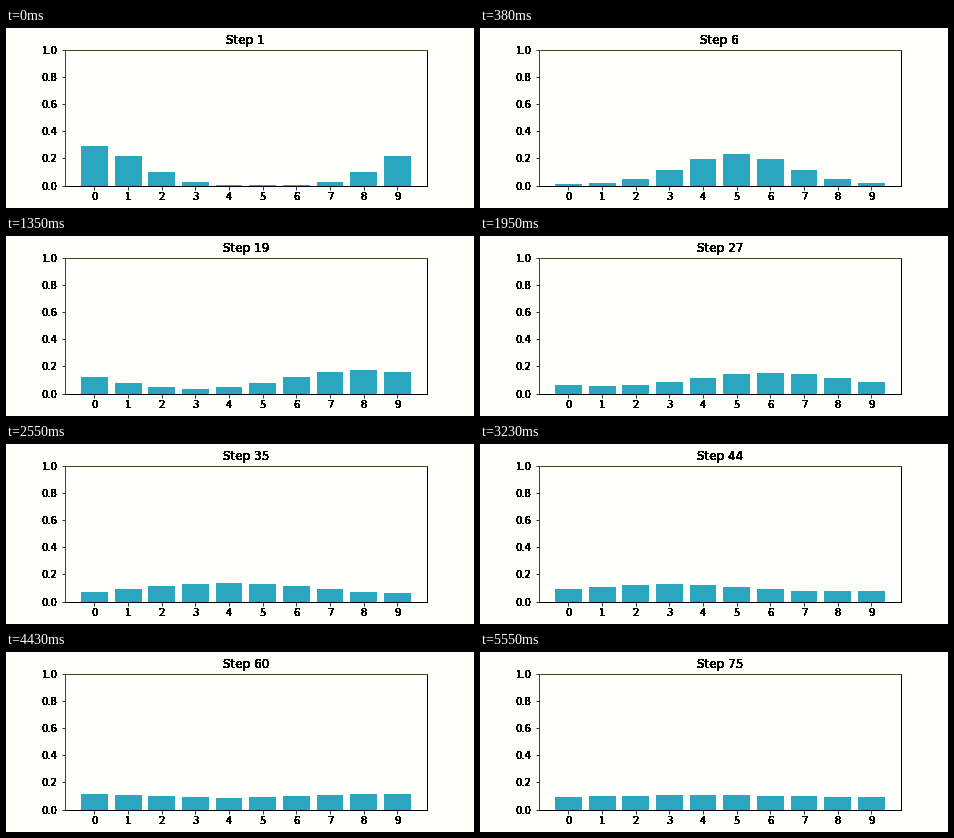
Animation, 468 px wide and 180 px high, one loop 5.62 s. Source, as a matplotlib script:

```python
import matplotlib.pyplot as plt
import numpy as np
from matplotlib.animation import FuncAnimation

CELLS, STEPS, LOOP_MS = 10, 75, 5620
WARMUP = 10  # moves made before the first step shown
PAPER, BLUE, OLIVE = "#fffffc", "#2ba6bf", "#464612"

plt.rcParams.update({
    "font.family": "DejaVu Sans",
    "font.size": 10,
    "axes.titlesize": 12,
    "axes.linewidth": 1,
    "figure.subplot.left": 0.125,
    "figure.subplot.right": 0.9,
    "figure.subplot.bottom": 0.125,
    "figure.subplot.top": 0.88,
})


def move(belief):
    """Shift one cell to the right, with a 10% under- and overshoot."""
    return (0.8 * np.roll(belief, 1)
            + 0.1 * belief
            + 0.1 * np.roll(belief, 2))


def run_filter():
    belief = np.eye(CELLS)[0]
    history = []
    for _ in range(WARMUP + STEPS):
        belief = move(belief)
        history.append(belief)
    return history[WARMUP - 1:WARMUP - 1 + STEPS]


def harden(image, dpi):
    """Turn every softly covered pixel solid black."""
    solid = np.zeros_like(image)
    solid[..., 3] = image[..., 3] > 0.06
    return solid, 0, 0


beliefs = run_filter()

fig, ax = plt.subplots(figsize=(6.5, 2.5), dpi=72, facecolor=PAPER)
ax.set_facecolor(PAPER)
bars = ax.bar(range(CELLS), beliefs[0], color=BLUE)
ax.set_ylim(0, 1)
ax.set_xticks(range(CELLS))
ax.spines[["left", "top"]].set_color(OLIVE)
for text in [ax.title, *ax.get_xticklabels(), *ax.get_yticklabels()]:
    text.set_agg_filter(harden)


def update(i):
    for bar, p in zip(bars, beliefs[i]):
        bar.set_height(p)
    ax.set_title(f"Step {i + 1}")
    return bars


anim = FuncAnimation(fig, update, frames=STEPS, interval=LOOP_MS / STEPS,
                     repeat=True, repeat_delay=0)
plt.show()
```
